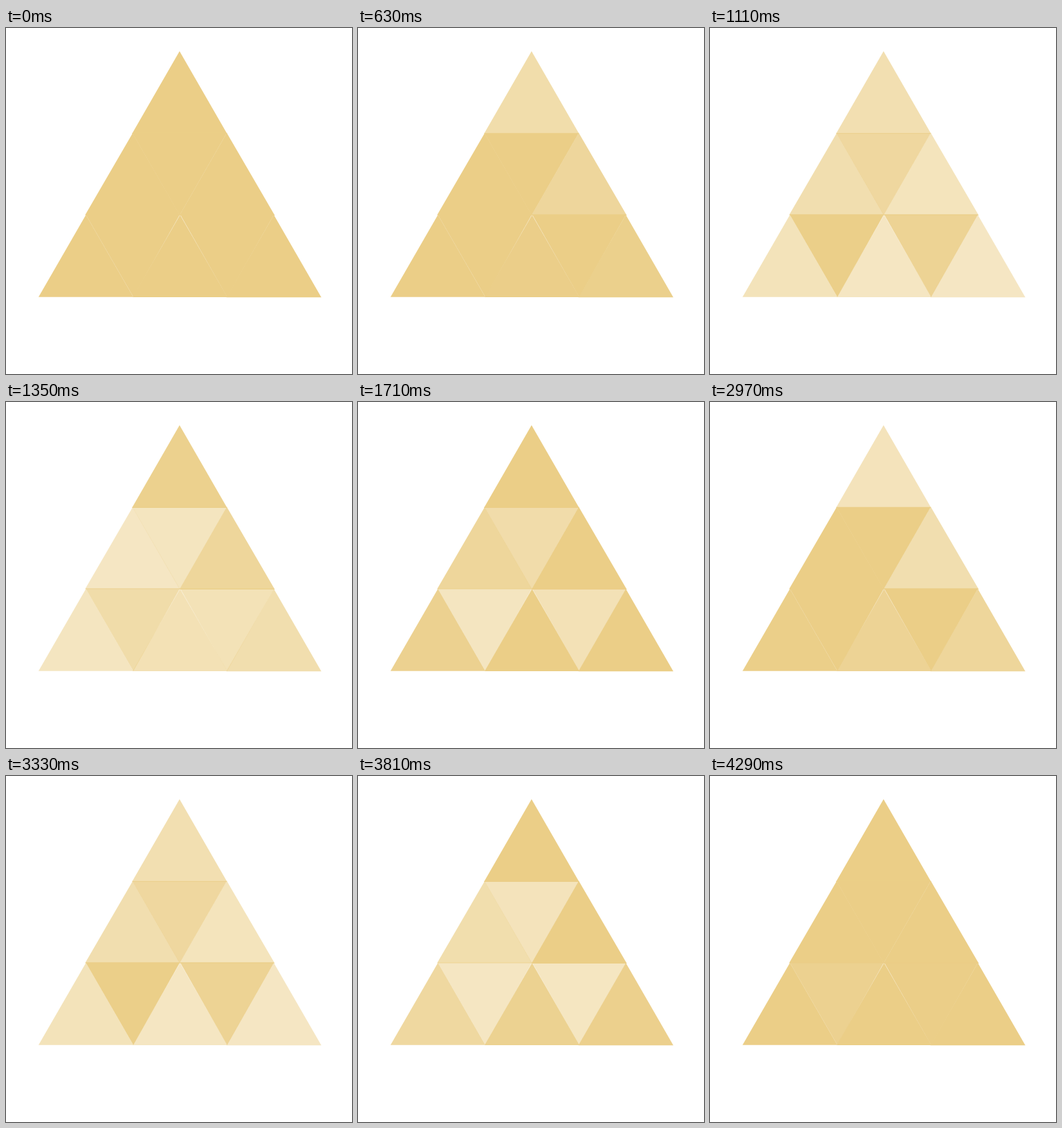
These frames come from a looping animation (500x500 px, 4500 ms). An HTML page:

```html
<!DOCTYPE html>
<html lang="en">
<head>
<meta charset="utf-8">
<title>Pulsing triangle</title>
<style>
  html, body { margin: 0; width: 100%; height: 100%; overflow: hidden; background: #fff; }
  svg { display: block; width: 100vw; height: 100vh; }
  polygon { fill: #ebce87; }
</style>
</head>
<body>
<svg id="stage" viewBox="0 0 500 500"></svg>
<script>
const LOOP = 4500;    // two pulses, the last pose held a little longer
const PULSE = 2220;
const START = 510;
const STEP = 120;
const LAST = 13;
const FADE = 600;     // time from full to half opacity

// Corners of each cell and the moment it is palest
const cells = [
  { points: "250.8,33.5 182,153 319.6,153", peak: 890 },
  { points: "183,152 114.2,270.5 251.5,270.5", peak: 1345 },
  { points: "182.5,151.8 319,151.8 251,270.5", peak: 1448 },
  { points: "319,151.5 250.5,271 388.5,271", peak: 985 },
  { points: "115.5,270 47,388.7 184,388.7", peak: 1265 },
  { points: "115,269.3 251.5,269.3 184,388.7", peak: 1625 },
  { points: "251.5,270 183,389 320,389", peak: 1157 },
  { points: "251.5,269.3 387.5,269.3 319.5,388.7", peak: 1524 },
  { points: "387,270 318.5,389.3 455.7,389.3", peak: 1113 }
];

const stage = document.getElementById("stage");
for (const cell of cells) {
  cell.node = document.createElementNS("http://www.w3.org/2000/svg", "polygon");
  cell.node.setAttribute("points", cell.points);
  stage.append(cell.node);
}

// The pulse moves in held steps
function heldTime(t) {
  if (t < START) return 0;
  return START + STEP * Math.min(LAST, Math.floor((t - START) / STEP));
}

function opacity(t, peak) {
  const x = Math.min(1, Math.abs(t - peak) / FADE);
  return 1 - 0.25 * (1 + Math.cos(Math.PI * x));
}

function draw(now) {
  const t = now % LOOP;
  const held = heldTime(t < PULSE ? t : t - PULSE);
  for (const { node, peak } of cells) {
    node.setAttribute("fill-opacity", opacity(held, peak).toFixed(3));
  }
}

const begin = performance.now();
function tick() {
  draw(performance.now() - begin);
  requestAnimationFrame(tick);
}
tick();
</script>
</body>
</html>
```
